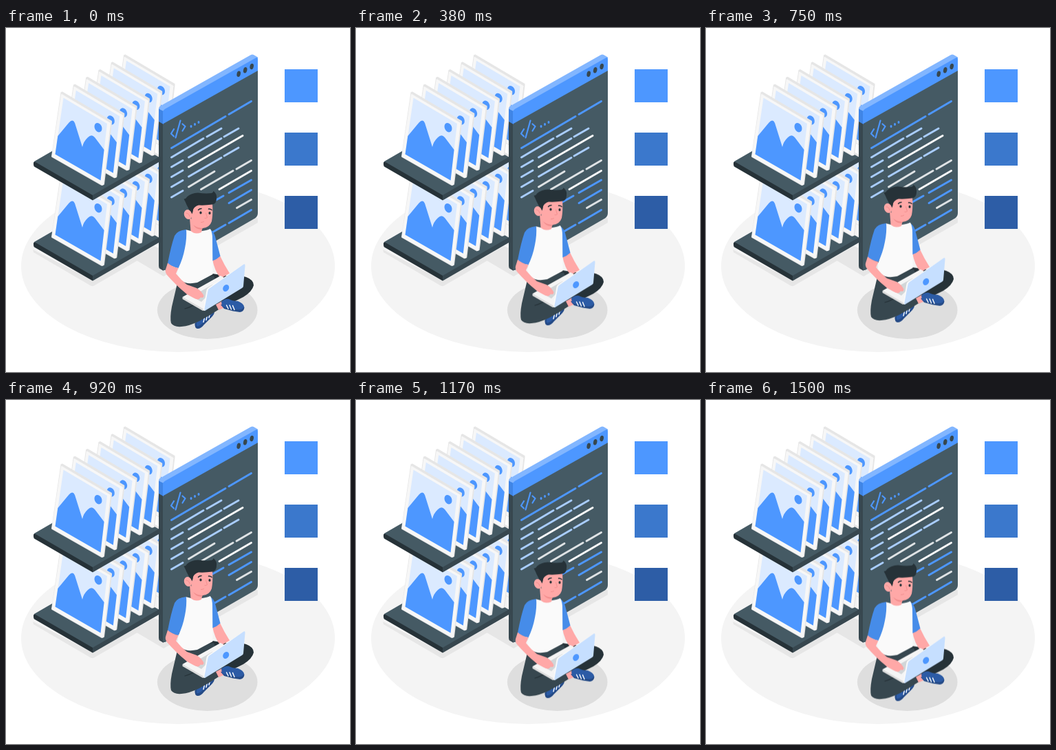
Recreate the animation shown at these times as an HTML page. Size 500 by 500 pixels, loop 1540 ms.

```html
<!DOCTYPE html>
<html lang="en">
<head>
<meta charset="utf-8">
<title>Developer at work</title>
<style>
  html, body { margin: 0; width: 100%; height: 100%; overflow: hidden; background: #fff; }
  svg { display: block; width: 100vw; height: 100vh; }

  .blue { fill: #4d97ff; }
  .pale { fill: #dbeaff; }
  .slate { fill: #455a64; }
  .steel { fill: #37474f; }
  .ink { fill: #263238; }
  .skin { fill: #ffa8a7; }
  .sleeve { fill: #468ce9; }
  .shade { fill: #e6e6e6; }
  .shoe { fill: #2c5ba5; }
  .sole { fill: #244a86; }
  .round { stroke-linejoin: round; stroke-width: 2; }

  .code path { fill: none; stroke-width: 2.9; stroke-linecap: round; }
  .line { fill: none; stroke-linecap: round; stroke-linejoin: round; }

  /* constant speed up and down, 37 poses per loop */
  .dev { animation: hover 1540ms -5ms infinite; }
  @keyframes hover {
    0% { transform: translateY(0); animation-timing-function: steps(18, end); }
    48.648% { transform: translateY(-9.73px); animation-timing-function: step-end; }
    48.649% { transform: translateY(-9.19px); animation-timing-function: steps(19, end); }
    100% { transform: translateY(1.08px); }
  }
</style>
</head>
<body>
<svg viewBox="0 0 500 500">
  <defs>
    <g id="photo">
      <path class="round" fill="#e6e6e6" stroke="#e6e6e6" d="M80.500 94 82 93.500 153 135.500 153 138 142 227 139 228 67 187Z"/>
      <path class="round" fill="#f7f7f7" stroke="#f7f7f7" d="M81 97 151 138.500 140.500 227.500 67.500 186.500Z"/>
      <path class="pale" d="M83.500 101.500 147 139 137.500 221.500 71.500 183.500Z"/>
      <path class="blue" d="M75.300 157 91.500 137.500Q97 131.500 100 138L111 173Q112.500 165 119 159Q124.500 153.500 129 159L142.600 177 137.500 221.500 71.500 183.500Z"/>
      <ellipse class="blue" cx="134" cy="144.700" rx="5.200" ry="7" transform="rotate(-24 134 144.700)"/>
    </g>
    <g id="shelf">
      <path class="slate" d="M41 194 136 139 222 187.500 222 191 126 244 41 197Z"/>
      <path class="ink" d="M40 196Q40 193.500 43 195L126 243V250.500L42 202Q40 201 40 198.500Z"/>
      <path class="steel" d="M126 243 222 187.500V195L126 250.500Z"/>
    </g>
    <g id="rack">
      <use href="#shelf"/>
      <use href="#photo" x="91.500" y="-54"/>
      <use href="#photo" x="73.200" y="-43.200"/>
      <use href="#photo" x="54.900" y="-32.400"/>
      <use href="#photo" x="36.600" y="-21.600"/>
      <use href="#photo" x="18.300" y="-10.800"/>
      <use href="#photo"/>
    </g>
  </defs>

  <!-- floor -->
  <ellipse cx="250" cy="346" rx="228" ry="125" fill="#f4f4f4"/>
  <path class="shade" d="M39 322 126 367 215 317 222 320 128 374.500Q126 376 123 374.500L40 326Z"/>
  <path class="shade" d="M190 338 222 319 362 274 366 277V283L229 361Z"/>
  <ellipse cx="292.700" cy="410" rx="72.800" ry="42" fill="#dedede"/>

  <use href="#rack" y="117"/>
  <use href="#rack"/>

  <!-- editor window -->
  <path class="steel" d="M222 134 229 138V353L224 350Q222 349 222 346Z"/>
  <path class="slate" d="M228 138.500 366 61V269Q366 274 362 276.500L232 351.500Q228 353.500 228 349Z"/>
  <path fill="#3f85e6" d="M222 117 229 119V140L222 136Z"/>
  <path fill="#82b6ff" d="M222 117.500Q222 114.500 225 113L356 39Q358 37.800 360 39L366 42.500 366 47 229 121Z"/>
  <path class="blue" d="M228 122Q228 119.500 231 117.700L363 43.500Q366 42 366 46V62L228 139.500Z"/>
  <g class="steel">
    <ellipse cx="338.200" cy="66.700" rx="2.700" ry="4.300" transform="rotate(12 338.200 66.700)"/>
    <ellipse cx="347.700" cy="61.300" rx="2.700" ry="4.300" transform="rotate(12 347.700 61.300)"/>
    <ellipse cx="357.200" cy="55.900" rx="2.700" ry="4.300" transform="rotate(12 357.200 55.900)"/>
  </g>
  <path class="line" stroke="#4d97ff" stroke-width="2.200" d="M244 147 240 153.500 244 157.500M253.500 134.500 246.500 159.500M256.500 139.500 260.500 143 256.500 149.500"/>
  <g class="blue">
    <ellipse cx="269" cy="143" rx="1.500" ry="2.100"/>
    <ellipse cx="274.500" cy="140" rx="1.500" ry="2.100"/>
    <ellipse cx="280" cy="137" rx="1.500" ry="2.100"/>
  </g>
  <g class="code">
    <path stroke="#4d97ff" d="M240.500 174.500 319 128.500M324 125.500 356.500 106.500M300 253 316 244M324 239.500 356.500 221M324 254.500 356.500 235.500M300 297 319 286M324 283.500 356.500 264.500"/>
    <path stroke="#a9cdff" d="M240.500 188 287 160.500M292 158 313 146M240.500 202 257 192.500M265.500 188 313 160.500M317 158 338 146M240.500 216.500 257 207M240.500 231 257 221.500M265.500 216 313 188.500M317 186 338 174M240.500 246 257 236.500"/>
    <path stroke="#fafafa" d="M265.500 202 344 156.500M310 234.500 356.500 207.500"/>
    <path stroke="#dfe3e5" d="M265.500 231 303 208.500M283.500 234.500 330 207.500M335 205 356.500 192.500M335.500 261.500 356.500 249.500"/>
  </g>

  <!-- badges -->
  <rect class="blue" x="405" y="60" width="48" height="48"/>
  <rect x="405" y="152" width="48" height="48" fill="#3b78cc"/>
  <rect x="405" y="244" width="48" height="48" fill="#2d5da6"/>

  <g class="dev">
    <!-- far leg and shoe -->
    <path class="ink" d="M262 366 300 357 325 361Q337 358 349 362Q360 366 360 374Q358 383 345 391L313 407 298 412 262 400Z"/>
    <path class="sole" d="M274.500 429 301 411Q305 413 300 419L288 431Q283 437.500 278 437Q274 436 274.500 429Z"/>
    <path class="shoe" d="M277 426 301 410Q303 413 298 418L286 429Q281 434 277 433Z"/>
    <path class="line" stroke="#fff" stroke-width="1.400" d="M287 427.500 288.500 421M291 424.500 292.500 418M295 421 296.500 415"/>

    <!-- near leg and shoe -->
    <path class="steel" d="M249 371Q254 365 262 366L302 360 314 390 311 408Q296 418 281 426Q267 433 255 434Q244 435 240 429Q238 421 241 405Z"/>
    <path class="line" stroke="#263238" stroke-width="1.200" d="M260 408Q269 406 278 399M248 372Q252 377 257 379"/>
    <path class="skin" d="M305 402 314 397 316 407 309 410Z"/>
    <path class="sole" d="M312 402 317 408 330 411.500 340 413Q346 412 346.500 406L343 402Z"/>
    <path class="shoe" d="M313 398Q318 393 324 394Q329 397 337 397Q345 400 346 405Q344 410 336 409.500L322 407 314 405Z"/>
    <path class="line" stroke="#fff" stroke-width="1.400" d="M320.500 403 323 408M325 403 327.500 409M329.500 403.500 332 409.500"/>

    <!-- torso -->
    <path class="skin" d="M300 336 311 331Q317 344 325 356.500L312 364Q303 353 300 336Z"/>
    <path class="sleeve" d="M295 292Q302 295 304 303L311.500 331.500Q307 336 300 338.500L296 320Z"/>
    <path fill="#fafafa" d="M261 293Q278 299 297 292Q300 297 300 306L300.500 358Q289 364 278 370Q263 373 256 368Q249 363 249.500 354Q256 335 255 318Z"/>
    <path class="sleeve" d="M262 293Q249 294 245 302Q240 316 235 342Q242 347.500 250.500 349Q257 336 260 320Q263 305 262 293Z"/>

    <!-- head -->
    <path class="skin" d="M267 276 268.500 295Q275 301 284 297L286 288Z"/>
    <path d="M272 286Q278 291 286 290.500L285 292.500Q277 294 272 286Z" fill="#f28f8f"/>
    <path class="skin" d="M268 262Q276 252 300 255Q301 270 299 281Q296 290 286 291Q275 290 270 282Z"/>
    <path class="ink" d="M268.500 272Q267 264 262.500 257Q261 253 258.500 248.500Q261.500 248.500 263 245.500Q269 240 279 239.500Q290 241 299 240Q301.500 239 301.500 237Q307 241 306 248Q306 255 300 256.500Q290 258 280 257.500Q274 259 272 264Q272 269 268.500 272Z"/>
    <ellipse class="skin" cx="264.500" cy="271" rx="5.600" ry="7" transform="rotate(-18 264.500 271)"/>
    <path class="line" stroke="#f28f8f" stroke-width="1" d="M262 269Q266 269 267 274M290.500 269 292.500 275.500Q291 277 289 276.500M283.500 282.500Q286 282.500 287.500 281.500"/>
    <path class="line" stroke="#263238" stroke-width="1.500" d="M279.500 264.500Q281 262.500 284 262.500M294.500 263Q297 262.500 299 264.500"/>
    <g class="ink">
      <ellipse cx="283" cy="268.500" rx="1.600" ry="1.900"/>
      <ellipse cx="296" cy="269" rx="1.600" ry="1.900"/>
    </g>

    <!-- laptop -->
    <path fill="#dcdcdc" d="M256.500 391V394L286 411 289 409 288 404Z"/>
    <path fill="#f5f5f5" d="M256.500 391 312 360 322 366 288 409Z"/>
    <path fill="#d2d6d8" d="M270 390 300 373 306 376 284 398Z"/>
    <path class="skin" d="M235 341.500Q242 347.500 250.500 349L247 357Q254 366 263 373L277 378Q284 382 287.500 389Q287 393 283 391.500Q280 397 272 392L263 387Q247 374 234 359Q231 355 232 351Z"/>
    <path fill="#fafafa" d="M291.500 381Q292 378.500 294 377.500L346 343.500 347 344 289 411 286.500 410.500Z"/>
    <path fill="#c6dfff" d="M293.500 382Q294 379.500 296 378.300L345.500 343.600Q347.800 342.500 347.500 345.500L345 375Q345 377 343 378L290 410.500Q288 411.500 288.300 409Z"/>
    <ellipse class="blue" cx="319.700" cy="378" rx="4.200" ry="5.300" transform="rotate(32 319.700 378)"/>
  </g>
</svg>
</body>
</html>
```
